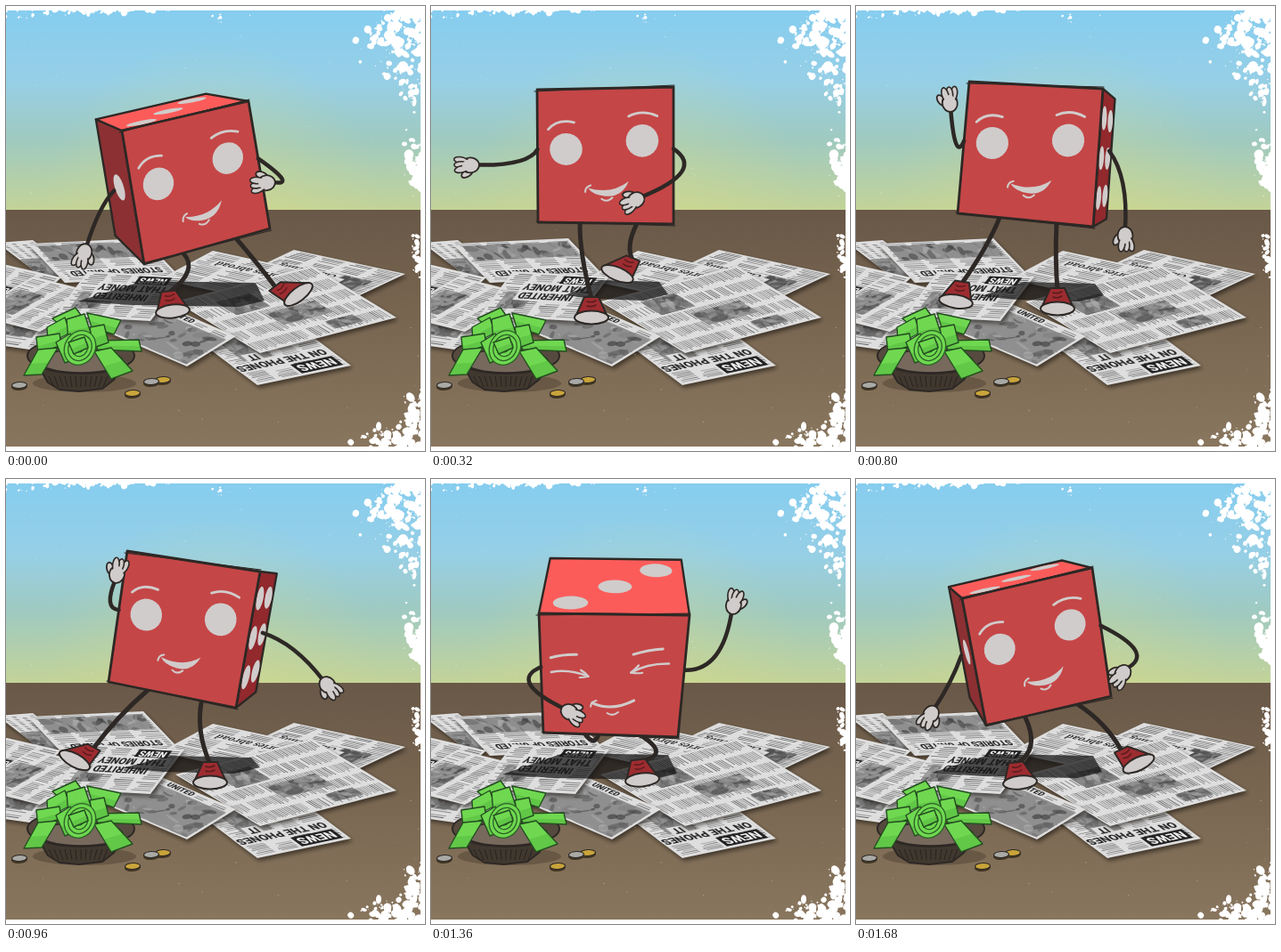
Write an HTML page with a canvas that moves like this. It is 470x500 px and loops after 1.76 s.

```html
<!DOCTYPE html>
<html lang="en">
<head>
<meta charset="utf-8">
<style>
html, body { margin: 0; width: 100%; height: 100%; overflow: hidden; background: #fff; }
canvas { display: block; }
</style>
</head>
<body>
<canvas id="stage" width="470" height="500"></canvas>
<script>
const ctx = document.getElementById('stage').getContext('2d');
const INK = '#2d2825', CHALK = '#d0cccb', LOOP = 1760, STEP = 80, STEPS = 22;

let seed = 7;
const rnd = () => (seed = (seed * 16807) % 2147483647) / 2147483647;
const mix = (a, b, t) => a + (b - a) * t;

function shape(g, pts, fill, stroke, width = 1.5) {
  g.beginPath();
  pts.forEach(([x, y]) => g.lineTo(x, y));
  g.closePath();
  if (fill) { g.fillStyle = fill; g.fill(); }
  if (stroke) { g.strokeStyle = stroke; g.lineWidth = width; g.lineJoin = 'round'; g.stroke(); }
}

function oval(g, x, y, rx, ry, angle, fill, stroke, width = 1.5) {
  g.beginPath();
  g.ellipse(x, y, rx, ry, angle, 0, Math.PI * 2);
  if (fill) { g.fillStyle = fill; g.fill(); }
  if (stroke) { g.strokeStyle = stroke; g.lineWidth = width; g.stroke(); }
}

function gradient(g, y0, y1, stops) {
  const fill = g.createLinearGradient(0, y0, 0, y1);
  stops.forEach(([at, color]) => fill.addColorStop(at, color));
  return fill;
}

// ---- scenery ----

// Newsprint on a parallelogram, laid out in pixels along its two sides.
function paper(g, x, y, ux, uy, vx, vy, { titles = [], photos = [], flip = false, cols = 4 } = {}) {
  const w = Math.hypot(ux, uy), h = Math.hypot(vx, vy);
  g.save();
  g.shadowColor = 'rgba(20,15,10,.6)';
  g.shadowBlur = 5;
  g.shadowOffsetY = 3;
  g.shadowOffsetX = 2;
  shape(g, [[x, y], [x + ux, y + uy], [x + ux + vx, y + uy + vy], [x + vx, y + vy]], '#dedede');
  g.shadowColor = 'transparent';
  g.clip();
  g.transform(ux / w, uy / w, vx / h, vy / h, x, y);
  if (flip) { g.translate(w, h); g.rotate(Math.PI); }
  const colW = w / cols;
  for (let c = 0; c < cols; c++) {
    for (let row = 4; row < h - 2; row += 2.6) {
      if (rnd() < .09) continue;
      const shade = 95 + rnd() * 70 | 0;
      g.fillStyle = `rgb(${shade},${shade},${shade})`;
      g.fillRect(c * colW + 3, row, (colW - 5) * (.7 + .3 * rnd()), 1.1);
    }
  }
  for (const [px, py, pw, ph] of photos) {
    g.save();
    g.beginPath();
    g.rect(px * w, py * h, pw * w, ph * h);
    g.fillStyle = '#8f8f8f';
    g.fill();
    g.clip();
    for (let i = 0; i < 45; i++) {
      const shade = 60 + rnd() * 120 | 0;
      oval(g, (px + rnd() * pw) * w, (py + rnd() * ph) * h, 2 + rnd() * 9, 1 + rnd() * 4, rnd() * 3,
        `rgba(${shade},${shade},${shade},.65)`);
    }
    g.restore();
  }
  for (const [text, size, tx, ty, inverse, face = 'Roboto, Arial, sans-serif'] of titles) {
    g.font = `900 ${size}px ${face}`;
    const tw = g.measureText(text).width;
    g.fillStyle = inverse ? '#222' : '#dedede';
    g.fillRect(tx - 3, ty - size * .9, tw + 6, size * 1.1);
    g.fillStyle = inverse ? '#eee' : '#2b2b2b';
    g.fillText(text, tx, ty);
  }
  g.restore();
}

function papers(g) {
  const script = 'Noto Serif, serif';
  paper(g, -10, 266, 40, -3, 50, 38, { photos: [[0, .5, .9, .5]] });
  paper(g, 24, 267, 130, -6, 42, 44, {
    flip: true, photos: [[.04, .56, .9, .36]], titles: [['STORIES OF UNITED', 11, 12, 17]] });
  paper(g, -30, 284, 92, 21, -40, 38, { flip: true, titles: [['DAILY', 10, 36, 25, true]] });
  paper(g, -20, 335, 140, 20, -30, 40, { photos: [[.1, .1, .4, .6]] });
  paper(g, 30, 304, 80, 20, -72, 42, { photos: [[.1, .3, .35, .5]] });
  paper(g, 213, 374, 105, -22, 69, 52, { flip: true, photos: [[.55, .45, .3, .45]], titles: [
    ['NEWS', 15, 9, 17, true], ['ON THE PHONES', 13, 6, 33], ['IT', 13, 72, 46]] });
  paper(g, 323, 274, 125, 27, -68, 32, {
    flip: true, photos: [[.1, .15, .25, .5]], titles: [['Chronicling', 11, 50, 46, false, script]] });
  paper(g, 232, 275, 148, 32, -60, 32, {
    flip: true, titles: [['Stories abroad', 11, 48, 52, false, script]] });
  paper(g, 343, 292, 95, 58, -153, 40, {
    cols: 5, photos: [[.48, .28, .22, .36], [.15, .55, .25, .25], [.8, .2, .13, .2]] });
  paper(g, 163, 330, 95, 41, -55, 34, { photos: [[.03, .16, .94, .8]], titles: [['UNITED', 9, 25, 8]] });
  paper(g, 92, 298, 108, 6, -38, 50, { flip: true, photos: [[.62, .2, .28, .35]], titles: [
    ['NEWS', 11, 15, 58, true], ['THAT MONEY', 12, 8, 47], ['INHERITED', 12, 22, 35]] });
}

function bill(g, ...pts) {
  shape(g, pts, '#6fd850', '#234b20', 1.4);
  const [a, b, c, d] = pts;
  const at = (p, q, t) => [mix(p[0], q[0], t), mix(p[1], q[1], t)];
  shape(g, [at(a, d, .55), at(b, c, .55), c, d], 'rgba(50,140,40,.22)');
}

function pot(g) {
  oval(g, 88, 424, 58, 10, 0, 'rgba(30,22,15,.25)');
  shape(g, [[31, 396], [47, 423], [60, 431], [82, 433], [108, 430], [121, 420], [139, 395]], '#40382f', INK, 2);
  oval(g, 84, 393, 60, 20, 0, '#564a3f', INK, 2);
  oval(g, 84, 399, 47, 13, 0, '#77695c', INK, 1.5);
  g.strokeStyle = '#29231e';
  g.lineWidth = 1;
  for (let i = 0; i < 12; i++) {
    g.beginPath();
    g.moveTo(48 + i * 6, 416);
    g.lineTo(54 + i * 5, 428);
    g.stroke();
  }
  bill(g, [52, 351], [78, 339], [91, 357], [66, 364]);
  bill(g, [91, 345], [129, 353], [121, 369], [96, 361]);
  bill(g, [46, 361], [66, 350], [72, 367], [47, 380]);
  bill(g, [34, 372], [60, 368], [62, 381], [36, 391]);
  bill(g, [36, 386], [58, 384], [40, 414], [20, 415]);
  bill(g, [98, 376], [149, 375], [152, 388], [103, 386]);
  bill(g, [99, 388], [118, 384], [142, 410], [118, 419]);
  bill(g, [68, 352], [88, 346], [97, 373], [70, 377]);
  bill(g, [94, 361], [110, 358], [115, 378], [98, 384]);
  bill(g, [56, 378], [72, 368], [84, 394], [66, 401]);
  for (let r = 20; r > 4; r -= 5) oval(g, 83, 384, r * .85, r, .5, '#6fd850', '#2c6126', 1.3);
  bill(g, [70, 378], [88, 372], [92, 384], [76, 391]);
}

function coin(g, x, y, color) {
  oval(g, x, y + 2, 9, 4, -.05, '#423624');
  oval(g, x, y, 8.5, 3.5, -.05, color, INK, 1.2);
}

function splatter(g, x, y, rx, ry, count, size) {
  const spread = () => rnd() + rnd() + rnd() - 1.5;
  for (let i = 0; i < count; i++) {
    const r = .4 + size * rnd() ** 2;
    oval(g, x + spread() * rx, y + spread() * ry, r, r * (.5 + rnd() * .6), rnd() * 3, '#fff');
  }
}

function grunge(g) {
  splatter(g, 105, 4, 75, 4, 110, 4);
  splatter(g, 25, 8, 50, 8, 25, 1.5);
  splatter(g, 455, 35, 34, 45, 150, 7);
  splatter(g, 425, 32, 28, 28, 70, 4);
  splatter(g, 456, 90, 16, 30, 45, 4);
  splatter(g, 462, 180, 13, 32, 70, 6);
  splatter(g, 465, 282, 8, 26, 45, 4);
  splatter(g, 462, 470, 18, 38, 95, 6);
  splatter(g, 430, 490, 32, 17, 100, 5);
  splatter(g, 245, 14, 22, 12, 10, 1.5);
  for (let i = 0; i < 45; i++)
    oval(g, rnd() * 465, 8 + rnd() * 485, .3 + rnd() * .7, .4, rnd() * 3, 'rgba(255,255,255,.5)');
}

function buildScene() {
  const layer = document.createElement('canvas');
  layer.width = 470;
  layer.height = 500;
  const g = layer.getContext('2d');
  g.fillStyle = '#fff';
  g.fillRect(0, 0, 470, 500);
  g.beginPath();
  g.rect(0, 5, 465, 490);
  g.clip();
  g.fillStyle = gradient(g, 5, 229, [[0, '#86cdef'], [.35, '#96cfe6'], [.65, '#a0cac0'], [1, '#c3d398']]);
  g.fillRect(0, 5, 465, 224);
  const glow = g.createRadialGradient(232, 229, 10, 232, 229, 190);
  glow.addColorStop(0, 'rgba(218,220,130,.4)');
  glow.addColorStop(1, 'rgba(218,220,130,0)');
  g.fillStyle = glow;
  g.fillRect(0, 5, 465, 224);
  g.fillStyle = gradient(g, 229, 495, [[0, '#695848'], [.4, '#76644f'], [1, '#89765e']]);
  g.fillRect(0, 229, 465, 266);
  papers(g);
  pot(g);
  coin(g, 15, 426, '#a9a9a6');
  coin(g, 142, 435, '#c9a43a');
  coin(g, 176, 420, '#c9a43a');
  coin(g, 163, 422, '#a9a9a6');
  grunge(g);
  return layer;
}

// ---- motion: each row belongs to the step in KEYS ----

const KEYS = [0, 2, 4, 6, 7, 9, 10, 12, 14, 17, 19, 21];

// Front face corners clockwise from top left, then the offset of the back face.
const cube = [
  [130, 140, 272, 107, 296, 250, 155, 290, -40, -20],
  [122, 90, 268, 79, 284, 228, 138, 240, -20, -2],
  [119, 94, 272, 91, 272, 245, 120, 243, 0, 0],
  [117, 149, 284, 147, 279, 282, 130, 286, -2, -60],
  [126, 117, 283, 113, 281, 267, 128, 267, -4, -30],
  [126, 74, 278, 76, 272, 230, 122, 224, 12, 4],
  [127, 85, 277, 93, 266, 248, 114, 233, 24, 2],
  [136, 81, 285, 104, 258, 257, 115, 228, 30, -6],
  [130, 82, 286, 86, 280, 240, 126, 236, 12, 0],
  [121, 151, 290, 153, 277, 290, 126, 285, 2, -71],
  [124, 105, 276, 97, 280, 245, 130, 255, -8, -20],
  [119, 134, 265, 100, 286, 244, 146, 277, -26, -20]
];

// Elbow, hand.
const leftArm = [
  [105, 230, 87, 279], [70, 200, 16, 203], [100, 176, 42, 179], [92, 195, 64, 142],
  [103, 186, 83, 125], [105, 165, 98, 108], [112, 160, 105, 107], [115, 140, 125, 105],
  [102, 175, 135, 190], [105, 230, 157, 263], [100, 230, 115, 268], [106, 228, 83, 266]
];
const rightArm = [
  [314, 196, 290, 199], [304, 195, 255, 210], [288, 186, 228, 219], [299, 205, 246, 244],
  [299, 208, 246, 239], [305, 195, 280, 255], [301, 198, 302, 260], [323, 190, 362, 233],
  [340, 196, 385, 190], [321, 203, 340, 140], [325, 175, 312, 175], [319, 193, 298, 220]
];

// Knee, sole centre, sole angle.
const leftLeg = [
  [207, 298, 187, 343, -.1], [180, 290, 182, 350, 0], [169, 280, 180, 350, 0], [164, 298, 180, 350, 0],
  [164, 294, 181, 348, -.05], [152, 275, 140, 338, .1], [145, 272, 112, 332, .15], [126, 268, 77, 316, .5],
  [150, 275, 155, 325, .3], [187, 296, 192, 278, 0], [190, 285, 186, 320, 0], [199, 300, 184, 341, -.1]
];
const rightLeg = [
  [284, 292, 328, 324, -.65], [250, 275, 265, 308, -.2], [222, 268, 209, 301, .4], [228, 296, 210, 282, .3],
  [230, 291, 204, 276, .1], [230, 280, 224, 320, 0], [224, 284, 226, 340, 0], [217, 284, 229, 341, 0],
  [228, 290, 232, 348, 0], [257, 308, 237, 338, -.1], [250, 285, 265, 330, -.2], [278, 276, 317, 320, -.45]
];

// Left, right, top, bottom.
const shadow = [
  [80, 290, 309, 338], [135, 275, 308, 332], [150, 266, 308, 331], [135, 276, 308, 338],
  [160, 276, 310, 337], [145, 276, 310, 332], [140, 278, 310, 332], [130, 285, 311, 331],
  [130, 280, 309, 332], [80, 276, 308, 338], [90, 276, 309, 335], [85, 276, 309, 336]
];

function sample(track, step) {
  let i = KEYS.length - 1;
  while (KEYS[i] > step) i--;
  const end = i + 1 < KEYS.length ? KEYS[i + 1] : STEPS;
  const next = track[(i + 1) % KEYS.length];
  const t = (step - KEYS[i]) / (end - KEYS[i]);
  return track[i].map((value, n) => mix(value, next[n], t));
}

// ---- character ----

// Maps u,v in 0..1 onto a quad with corners clockwise from top left.
const onQuad = ([a, b, c, d]) => (u, v) =>
  [0, 1].map(n => mix(mix(a[n], b[n], u), mix(d[n], c[n], u), v));

function spot(map, u, v, r, rv = r) {
  const pts = [];
  for (let i = 0; i < 24; i++) {
    const a = i * Math.PI / 12;
    pts.push(map(u + r * Math.cos(a), v + rv * Math.sin(a)));
  }
  shape(ctx, pts, CHALK);
}

function curve(p, control, q, color, width) {
  ctx.beginPath();
  ctx.moveTo(...p);
  ctx.quadraticCurveTo(...control, ...q);
  ctx.strokeStyle = color;
  ctx.lineWidth = width;
  ctx.lineCap = 'round';
  ctx.stroke();
}

function limb(from, bend, to, width) {
  const control = [0, 1].map(n => bend[n] * 1.6 - (from[n] + to[n]) * .3);
  curve(from, control, to, INK, width);
}

function arm(shoulder, [ex, ey, hx, hy], side) {
  const angle = Math.atan2(hy - ey, hx - ex);
  limb(shoulder, [ex, ey], [hx - 9 * Math.cos(angle), hy - 9 * Math.sin(angle)], 4.5);
  ctx.save();
  ctx.translate(hx, hy);
  ctx.rotate(angle);
  ctx.scale(1, side);
  oval(ctx, 2, -9, 7, 3.8, -.5, CHALK, INK, 1.8);
  oval(ctx, -2, 0, 10, 8.5, 0, CHALK, INK, 1.8);
  for (const y of [6, 1, -4]) oval(ctx, 8, y, 8, 3.7, y * .04, CHALK, INK, 1.6);
  oval(ctx, -1, 0, 8, 6.5, 0, CHALK);
  ctx.restore();
}

function leg(hip, [kx, ky, x, y, angle]) {
  const cos = Math.cos(angle), sin = Math.sin(angle);
  const local = (a, b) => [x + a * cos - b * sin, y + a * sin + b * cos];
  const heel = 24 * angle;
  limb(hip, [kx, ky], local(heel, -21), 5);
  shape(ctx, [local(heel - 8, -23), local(heel + 8, -23), local(17, -3), local(12, 5), local(-12, 5), local(-17, -3)],
    '#9d2c30', INK, 2);
  oval(ctx, x, y, 19, 7.5, angle, CHALK, INK, 2);
  for (const row of [-18, -13])
    curve(local(heel * .7 - 5, row), local(heel * .7, row + 2), local(heel * .7 + 5, row - 1), '#5a1c1e', 1.5);
}

function chalkLine(face, points, width) {
  const [p, c, q] = points.map(([u, v]) => face(u, v));
  curve(p, c, q, CHALK, width);
}

function expression(face, squinting) {
  if (squinting) {
    chalkLine(face, [[.07, .37], [.15, .34], [.25, .34]], 3);
    chalkLine(face, [[.07, .49], [.2, .46], [.33, .52]], 2.5);
    chalkLine(face, [[.28, .47], [.31, .49], [.33, .52]], 2.5);
    chalkLine(face, [[.27, .53], [.3, .53], [.33, .52]], 2);
    chalkLine(face, [[.64, .33], [.74, .29], [.84, .28]], 3);
    chalkLine(face, [[.63, .48], [.74, .4], [.89, .4]], 2.5);
    chalkLine(face, [[.68, .42], [.66, .45], [.63, .48]], 2.5);
    chalkLine(face, [[.63, .48], [.67, .49], [.71, .48]], 2);
    chalkLine(face, [[.36, .74], [.5, .81], [.66, .71]], 3);
  } else {
    spot(face, .21, .45, .12);
    spot(face, .77, .39, .12);
    chalkLine(face, [[.08, .3], [.15, .22], [.27, .25]], 2.8);
    chalkLine(face, [[.67, .21], [.77, .16], [.88, .21]], 2.8);
    ctx.beginPath();
    ctx.moveTo(...face(.37, .74));
    ctx.quadraticCurveTo(...face(.54, .79), ...face(.67, .69));
    ctx.quadraticCurveTo(...face(.62, .81), ...face(.5, .8));
    ctx.quadraticCurveTo(...face(.4, .79), ...face(.37, .74));
    ctx.fillStyle = CHALK;
    ctx.fill();
  }
  chalkLine(face, [[.35, .77], [.35, .73], [.39, .72]], 2);
  chalkLine(face, [[.47, .82], [.51, .85], [.55, .81]], 2);
}

function die(front, back, dx, dy, squinting) {
  const [tl, tr, br, bl] = front, [btl, btr, bbr, bbl] = back;
  const side = (quad, color) => {
    shape(ctx, quad, color, INK, 2.4);
    return onQuad(quad);
  };
  if (dx < -5) spot(side([btl, tl, bl, bbl], '#8d3033'), .5, .5, .2, .1);
  if (dx > 5) {
    const right = side([tr, btr, bbr, br], '#91292d');
    for (const v of [.2, .5, .8]) for (const u of [.27, .76]) spot(right, u, v, .2, .09);
  }
  if (btl[1] < tl[1] - 2 && btr[1] < tr[1] + 2 && dy < -10) {
    const top = side([btl, btr, tr, tl], '#fb5c5a');
    [.2, .5, .8].forEach(p => spot(top, p, 1 - p, .12));
  }
  shape(ctx, front, '#c54647', INK, 2.8);
  ctx.strokeStyle = INK;
  ctx.lineWidth = 1.2;
  ctx.beginPath();
  ctx.moveTo(tl[0] - 3, tl[1] + 2);
  ctx.lineTo(tr[0] + 1, tr[1] - 2);
  ctx.moveTo(br[0] + 2, br[1] + 2);
  ctx.lineTo(bl[0] - 2, bl[1] - 1);
  ctx.stroke();
  expression(onQuad(front), squinting);
}

function castShadow([x0, x1, y0, y1]) {
  const w = x1 - x0;
  shape(ctx, [[x0, y1 - 6], [x0 + w * .35, y0], [x1 - 10, y0 + 2], [x1, y1 - 7], [x1 - 28, y1], [x0 + w * .3, y1 - 2]],
    'rgba(25,24,23,.74)');
}

function character(step) {
  const c = sample(cube, step), [dx, dy] = c.slice(8);
  const front = [0, 2, 4, 6].map(i => [c[i], c[i + 1]]);
  const face = onQuad(front), centre = face(.5, .5);
  const back = front.map(([x, y]) => [mix(x, centre[0], .13) + dx, mix(y, centre[1], .13) + dy]);
  const shoulder = (u, shift) => {
    const [x, y] = face(u, .45);
    return [x + shift * .5, y];
  };
  const squinting = (step >= 5 && step <= 7) || (step >= 16 && step <= 18);
  castShadow(sample(shadow, step));
  leg(face(.31, 1), sample(leftLeg, step));
  leg(face(.73, 1), sample(rightLeg, step));
  die(front, back, dx, dy, squinting);
  arm(shoulder(0, Math.min(dx, 0)), sample(leftArm, step), 1);
  arm(shoulder(1, Math.max(dx, 0)), sample(rightArm, step), -1);
}

const scene = buildScene();
const start = performance.now();

function draw() {
  const time = Math.max(0, performance.now() - start) % LOOP;
  ctx.drawImage(scene, 0, 0);
  character(Math.floor(time / STEP));
  requestAnimationFrame(draw);
}
draw();
</script>
</body>
</html>
```
